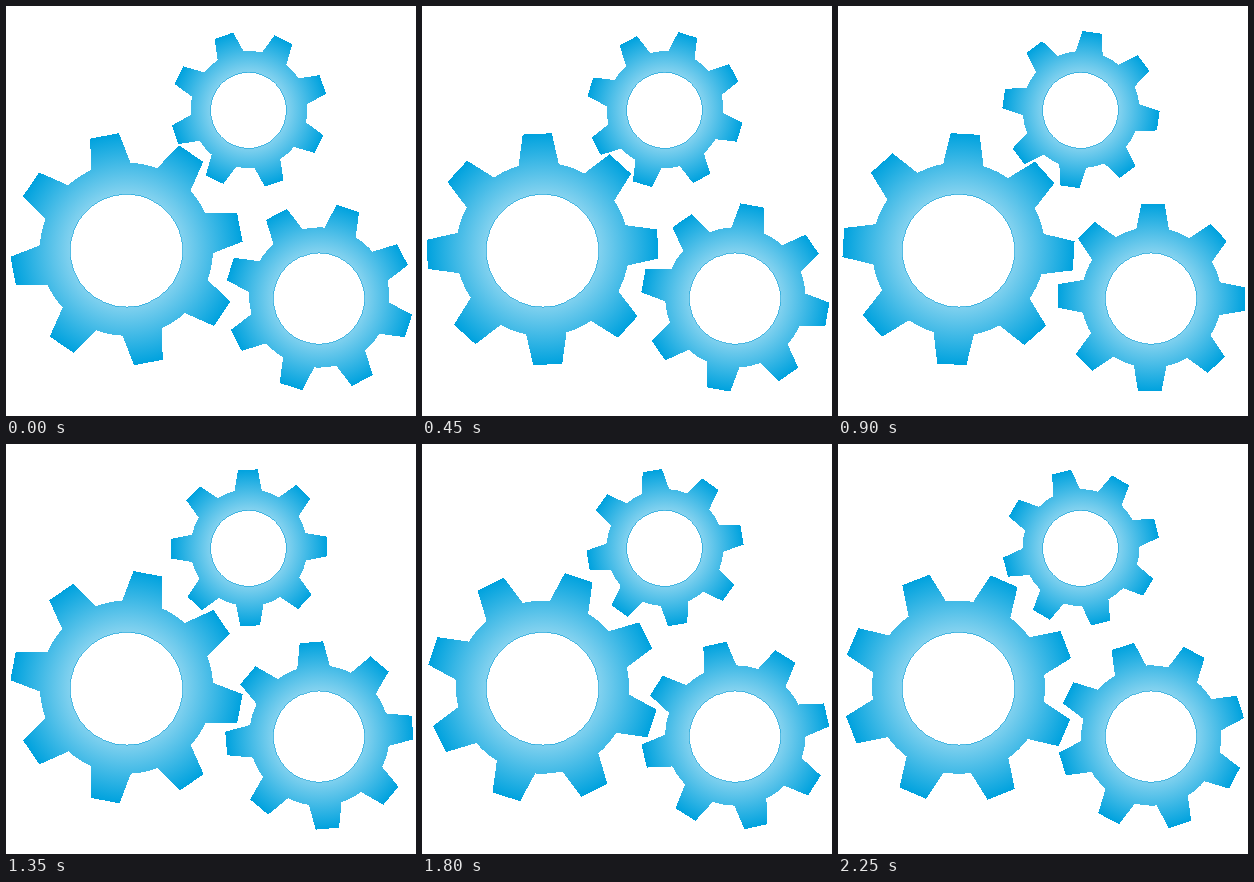
Recreate the animation shown at these times as an HTML page. Size 410 by 410 pixels, loop 2.7 s.

```html
<!DOCTYPE html>
<html lang="en">
<head>
<meta charset="utf-8">
<title>Gears</title>
<style>
  html, body { margin: 0; width: 100%; height: 100%; overflow: hidden; background: #fff; }
  svg { display: block; width: 100vw; height: 100vh; }
</style>
</head>
<body>
<svg viewBox="0 0 410 410" shape-rendering="crispEdges">
  <defs>
    <radialGradient id="shade" gradientUnits="userSpaceOnUse" cx="0" cy="0" r="1">
      <stop offset="0" stop-color="#fff"/>
      <stop offset="1" stop-color="#00a2de"/>
    </radialGradient>
  </defs>
</svg>
<script>
const STEP = 450;
const TEETH = 8;
const svg = document.querySelector('svg');

// Each gear turns one tooth pitch (45 degrees) per loop, in six held poses.
const gears = [
  { x: 120.5, y: 243.2, size: 115.4, hole: { x: 120.5, y: 244.7, r: 56.4 },
    poses: [-10.9, -2.6, 3.3, 10.6, 18.3, 23.3] },
  { x: 313.4, y: 291.5, size: 93.5, hole: { x: 313, y: 292.6, r: 45.7 },
    poses: [17.7, 10.3, 1, -4.9, -12.7, -17.8] },
  { x: 243, y: 103.6, size: 78, hole: { x: 242.5, y: 104.4, r: 38 },
    poses: [26.2, 16.9, 8.2, -0.8, -9.4, -14.5] }
];

function add(name, attributes) {
  const node = document.createElementNS(svg.namespaceURI, name);
  for (const key in attributes) node.setAttribute(key, attributes[key]);
  return svg.appendChild(node);
}

// Outline of a gear with unit distance from its centre to the tooth tips.
function gearPath() {
  const rim = 0.75, baseHalf = 0.175, tipHalf = 0.126;
  const baseY = -Math.sqrt(rim * rim - baseHalf * baseHalf);
  const tooth = [[-baseHalf, baseY], [-tipHalf, -1], [tipHalf, -1], [baseHalf, baseY]];
  let path = '';
  for (let i = 0; i < TEETH; i++) {
    const angle = i * 2 * Math.PI / TEETH;
    const c = Math.cos(angle), s = Math.sin(angle);
    const points = tooth.map(([x, y]) => `${x * c - y * s} ${x * s + y * c}`);
    path += (i ? `A${rim} ${rim} 0 0 1 ` : 'M') + points.join('L');
  }
  return path + `A${rim} ${rim} 0 0 1 ${-baseHalf} ${baseY}Z`;
}

const outline = gearPath();
for (const gear of gears) {
  gear.node = add('path', { d: outline, fill: 'url(#shade)' });
  add('circle', {
    cx: gear.hole.x, cy: gear.hole.y, r: gear.hole.r,
    fill: '#fff', stroke: '#2aabdd', 'stroke-width': 0.8
  });
}

function draw() {
  const pose = Math.floor(performance.now() / STEP) % 6;
  for (const { node, x, y, size, poses } of gears) {
    node.setAttribute('transform', `translate(${x} ${y}) rotate(${poses[pose]}) scale(${size})`);
  }
  requestAnimationFrame(draw);
}
draw();
</script>
</body>
</html>
```
